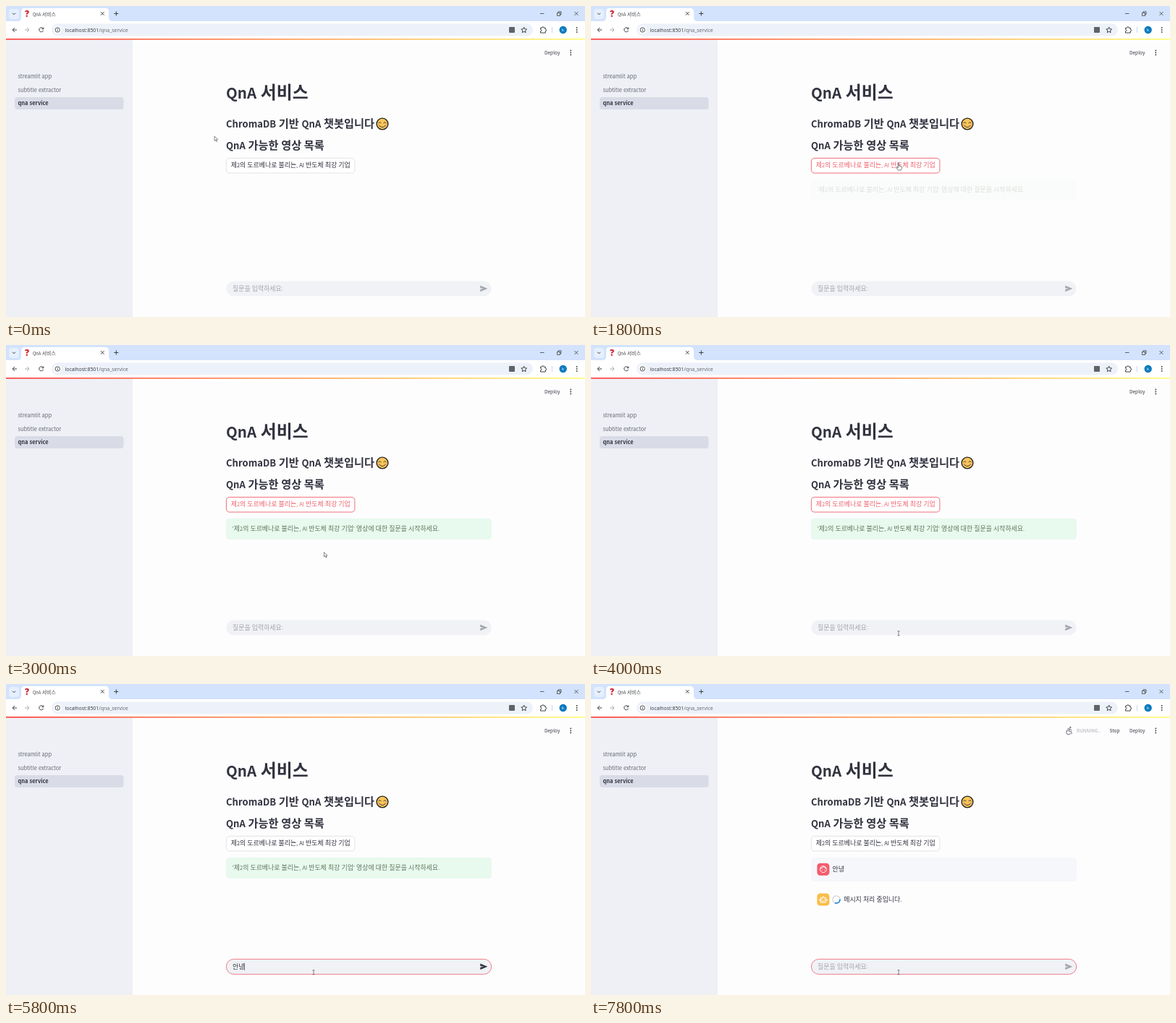
These frames come from a looping animation (800x430 px, 8 s). An HTML page:

```html
<!DOCTYPE html>
<html lang="ko">
<head>
<meta charset="utf-8">
<style>
html, body { margin: 0; width: 100%; height: 100%; overflow: hidden; background: #fefdfe; }
svg { display: block; width: 100vw; height: 100vh; }
text { white-space: pre; font-family: "Noto Sans CJK KR", "Noto Sans CJK", "Noto Sans", sans-serif; }
.ui { font-family: "Open Sans", "Noto Sans", sans-serif; }
.line { fill: none; stroke: #3c4043; stroke-width: 1; }
</style>
</head>
<body>
<svg id="stage" viewBox="0 0 800 430"></svg>
<script>
const LOOP = 8000, STEP = 200;
const INK = '#31333f', RED = '#ed5f6a', GREY = '#a3a5ae';
const VIDEO = '제2의 도르베나로 불리는, AI 반도체 최강 기업';

// Hangul and Latin get separate sizes so both match one nominal size.
const runs = (size, str, hangul = 1.072) => str.split(/([가-힣ㄱ-ㅎ]+)/).filter(Boolean).map(part => {
  const scale = /[가-힣ㄱ-ㅎ]/.test(part) ? hangul : 0.895;
  return `<tspan font-size="${(size * scale).toFixed(2)}">${part}</tspan>`;
}).join('');
const text = (x, y, size, str, fill = INK, extra = '') =>
  `<text x="${x}" y="${y}" fill="${fill}" ${extra}>${runs(size, str)}</text>`;
const heading = (y, size, str) =>
  `<text x="304" y="${y}" fill="${INK}" font-weight="700">${runs(size, str, 1.043)}</text>`;
const rect = (x, y, w, h, r, fill, extra = '') =>
  `<rect x="${x}" y="${y}" width="${w}" height="${h}" rx="${r}" fill="${fill}" ${extra}/>`;
const circle = (x, y, r, fill, extra = '') =>
  `<circle cx="${x}" cy="${y}" r="${r}" fill="${fill}" ${extra}/>`;
const line = (d, extra = '') => `<path class="line" d="${d}" ${extra}/>`;
const group = (id, body, extra = '') => `<g id="${id}" ${extra}>${body}</g>`;
const kebab = (x, y) => [-3, 0, 3].map(d => circle(x, y + d, 0.9, '#3c4043')).join('');

const browser = `
  ${rect(0, 0, 800, 30, 0, '#d3e3fd')}
  ${rect(4, 4, 14, 14, 4, '#e6effe')}
  ${line('M9 9.8l2 2 2-2')}
  <path d="M16 21q5 0 5-5V8q0-5 5-5H137q5 0 5 5v8q0 5 5 5z" fill="#fff"/>
  ${rect(0, 21, 800, 24, 0, '#fff')}
  <text class="ui" x="26" y="15.3" font-size="12" font-weight="800" fill="#d3202f">?</text>
  ${text(37, 13.6, 6.4, 'QnA 서비스', '#3c4043')}
  ${line('M131 8.2l4.5 4.5m0-4.5l-4.5 4.5M149.3 10.5h6m-3-3v6')}
  ${line('M738 10.5h5.5M761.5 9.5h4v4h-4zM763 9.3v-1.5h4v4h-1.3M785.5 8l5 5m0-5l-5 5', 'style="stroke-width:.8"')}
  ${line('M15 33H9m3-3l-3 3 3 3')}
  ${line('M26 33h6m-3-3l3 3-3 3', 'style="stroke:#a9adb2"')}
  ${line('M51.3 31.2a3 3 0 1 0 .3 2.6M51.8 29.5v2.3h-2.3')}
  ${rect(63, 24.5, 665, 17, 8.5, '#edf1fa')}
  ${circle(71.2, 33, 5.5, '#fff')}
  ${circle(71.2, 33, 3.2, 'none', 'stroke="#3c4043" stroke-width=".9"')}
  ${line('M71.2 32.5v2.2M71.2 31v.8')}
  <text class="ui" x="81.5" y="35.7" font-size="6.95" fill="#33363b">localhost:8501<tspan fill="#5f6368">/qna_service</tspan></text>
  ${rect(695, 29, 8, 8, 1, '#5f6368')}
  ${line('M715.7 29.3l1.1 2.5 2.8.3-2.1 1.9.6 2.7-2.4-1.4-2.4 1.4.6-2.7-2.1-1.9 2.8-.3z')}
  ${line('M738.5 30.3h2.2q0-1.5 1.2-1.5t1.2 1.5h2.2v2q1.5 0 1.5 1.2t-1.5 1.2v2.4h-6.8v-2.2q1.6 0 1.6-1.3t-1.6-1.3z')}
  ${line('M754.5 29v8', 'style="stroke:#c3d5f5"')}
  ${circle(769.7, 33, 5.2, '#0a7abf')}
  <text class="ui" x="769.7" y="35" font-size="6" fill="#fff" text-anchor="middle">k</text>
  ${kebab(788.7, 33)}`;

const emoji = `
  ${circle(520, 163, 7.9, '#fbc658', 'stroke="#222" stroke-width="1.4"')}
  ${circle(515.2, 165, 1.5, '#f59a62')}${circle(524.8, 165, 1.5, '#f59a62')}
  ${line('M514.8 161.8q1.7-2.6 3.4 0M521.8 161.8q1.7-2.6 3.4 0M516.2 165.7q3.8 4 7.6 0', 'stroke-linecap="round"')}`;

const page = `
  ${rect(0, 45, 175, 385, 0, '#eef0f5')}
  ${rect(0, 45, 800, 1.8, 0, 'url(#deco)')}
  ${rect(12, 126, 150.5, 17, 4, '#d9dce6')}
  ${text(16.5, 100, 8.33, 'streamlit app', '#676975')}
  ${text(16.5, 118.8, 8.33, 'subtitle extractor', '#676975')}
  ${text(16.5, 137.3, 8.33, 'qna service', INK, 'font-weight="700"')}
  ${text(744, 67, 7.3, 'Deploy')}
  ${kebab(780.3, 64.5)}
  ${heading(127.8, 22.9, 'QnA 서비스')}
  ${heading(168.2, 14.6, 'ChromaDB 기반 QnA 챗봇입니다')}
  ${emoji}
  ${heading(198.2, 14.6, 'QnA 가능한 영상 목록')}
  ${rect(304.4, 210.4, 177.5, 20.6, 4.2, '#fff', 'id="button" stroke-width=".9"')}
  ${text(393.2, 223.4, 8.33, VIDEO, INK, 'id="label" text-anchor="middle"')}`;

const notice = group('notice',
  rect(304, 239.7, 367, 29.3, 4.2, '#e8f9ee') +
  text(312.7, 257, 8.33, `'${VIDEO}' 영상에 대한 질문을 시작하세요.`, '#63765c'));

const question = group('question', `
  ${rect(304, 239.7, 367, 33.3, 4.2, '#f6f7fa')}
  ${rect(312.4, 247.7, 17, 17, 4.2, '#f45b6c')}
  <g fill="none" stroke="#fff" stroke-width="1">
    ${circle(320.9, 256.2, 4.4, 'none')}
    <path d="M317 254.8q3 .2 4.2-2.6 1.3 2.4 4 2.4"/>
  </g>
  ${circle(319.3, 257, 0.6, '#fff')}${circle(322.6, 257, 0.6, '#fff')}
  ${text(333.5, 259, 8.33, '안녕')}`);

const answer = group('answer', `
  ${rect(312.4, 289.6, 17, 17, 4.2, '#fbbd48')}
  <g fill="none" stroke="#fff" stroke-width="1">
    <path d="M317.6 295.2h6.6v7h-6.6zM320.9 295v-2M317.4 297.8h-1.6v2h1.6M324.4 297.8h1.6v2h-1.6M319.2 300.5h3.4"/>
  </g>
  ${circle(319.4, 297.7, 0.7, '#fff')}${circle(322.4, 297.7, 0.7, '#fff')}`);

const spinner = group('spinner', `
  ${circle(339, 298, 5, 'none', 'stroke="#d9dbe0" stroke-width="1.5"')}
  <path id="arc" d="M339 293a5 5 0 0 1 4.33 7.5" fill="none" stroke="#2b8be0" stroke-width="1.7"/>
  ${text(349.2, 301, 8.33, '메시지 처리 중입니다.')}`);

const input = `
  ${rect(304.4, 380.4, 366.3, 20.9, 10.4, '#f0f2f6', 'id="field" stroke-width=".8"')}
  ${text(313, 393.8, 8.33, '질문을 입력하세요:', GREY, 'id="placeholder"')}
  ${text(313, 393.8, 8.33, '', INK, 'id="typed"')}
  ${rect(0, 386, 0.7, 10, 0, INK, 'id="caret"')}
  <path id="send" d="M655.3 386.6l10 4.2-10 4.2v-3.3l5-.9-5-.9z"/>`;

// Small figures drawn around (0, 0) with the head as a separate dot.
const POSES = [
  { head: [1.5, -4.3], d: 'M1 -2.5L-.5 1l2 1.7-.8 3M-.5 1l-1.5 2.4-2.6.3M.8 -2.2l-3 1-.8 1.8M.8 -2.2l1.6 2 2.3-.4' },
  { head: [1.8, -4.3], d: 'M1 -2.7L-.3 1h3l1.2 3.8M.8 -2.2L3.7-.4M-1.2 -.4a3 3 0 1 0 3.3 4M.8 -2.4l-3 .2' },
  { head: [0, -4.6], d: 'M-4.6 -2.4h9.2M0 -2.6V1.2M-.6 -2v3.2L-1.3 6M.6 -2v3.2L1.3 6' },
  { head: [2.4, -3.6], d: 'M1.5 -2.4L-2 .2l2.4 1.4-.8 3.2M1.5 -2.4l2 2.6h1.3M-2 .2l-2.6 3' }
];
const running = group('running', `
  ${group('figure', '', 'transform="translate(660.5 64.3)"')}
  ${text(671, 67, 7.3, 'RUNNING...', '#a9abb4')}
  ${text(716.5, 67, 7.3, 'Stop')}`);

const cursors =
  group('arrow', '<path d="M0 0v6.4l1.5-1.3 1.1 2.3 1-.4-1-2.3h2z" fill="#fff" stroke="#555" stroke-width=".7"/>') +
  group('hand', '<path d="M-.7 .6Q0-.5.7.6V4l3.2.8q.9.4.7 1.5L4 8.3 3.2 10H-.6L-3.2 6.5q0-1.2 1.2-.7L-.7 6.8z" fill="#fff" stroke="#444" stroke-width=".7"/>') +
  group('beam', line('M-1.5-3h3M0-3v6M-1.5 3h3', 'style="stroke:#555;stroke-width:.7"'));

stage.innerHTML = `
  <defs><linearGradient id="deco"><stop stop-color="#ff4b4b"/><stop offset="1" stop-color="#fffd80"/></linearGradient></defs>
  ${rect(0, 0, 800, 430, 0, '#fefdfe')}
  ${browser}${page}${notice}${question}${answer}${spinner}${input}${running}${cursors}`;

const $ = id => document.getElementById(id);
const show = (id, on) => $(id).setAttribute('visibility', on ? 'visible' : 'hidden');
const clamp = v => Math.min(1, Math.max(0, v));
const ease = p => p * p * (3 - 2 * p);

const CLICK = 1400, FOCUS = 4100, SEND = 6000;
const PATH = [[200, 288, 180], [1000, 425, 217], [2400, 425, 217], [2800, 439.5, 286.5],
              [3300, 439.5, 286.5], [3900, 425, 398.7]];
const KEYS = [[4400, 'd'], [5200, ''], [5400, 'ㅇ'], [5600, '안'], [5800, '안녕'], [SEND, '']];

function pointer(t) {
  const i = PATH.findIndex(p => p[0] > t);
  if (i === 0) return PATH[0].slice(1);
  if (i < 0) return PATH[PATH.length - 1].slice(1);
  const [t0, x0, y0] = PATH[i - 1], [t1, x1, y1] = PATH[i];
  const p = ease((t - t0) / (t1 - t0));
  return [x0 + (x1 - x0) * p, y0 + (y1 - y0) * p];
}

function draw(t) {
  const [x, y] = pointer(t);
  const onButton = x > 304 && x < 482 && y > 210 && y < 231;
  const kind = onButton ? 'hand' : y > 380 ? 'beam' : 'arrow';
  for (const id of ['arrow', 'hand', 'beam']) show(id, id === kind);
  $(kind).setAttribute('transform', `translate(${x} ${y})`);

  const red = onButton || (t >= CLICK && t < FOCUS);
  $('button').setAttribute('stroke', red ? RED : '#dfe0e5');
  $('label').setAttribute('fill', red ? RED : INK);
  $('notice').setAttribute('opacity', t < SEND ? clamp((t - 1670) / 600) : 0);

  const focused = t >= FOCUS;
  const key = KEYS.filter(k => k[0] <= t).pop();
  const typed = key ? key[1] : '';
  $('field').setAttribute('stroke', focused ? RED : 'none');
  $('typed').innerHTML = runs(8.33, typed);
  show('placeholder', !typed);
  $('send').setAttribute('fill', typed ? INK : GREY);
  const blinkStart = key ? key[0] : FOCUS;
  show('caret', focused && (t - blinkStart) % 1060 < 530);
  $('caret').setAttribute('x', 312.6 + (typed ? $('typed').getComputedTextLength() : 0));

  show('question', t >= SEND);
  show('running', t >= SEND);
  show('answer', t >= 6200);
  show('spinner', t >= 6600);
  $('arc').setAttribute('transform', `rotate(${(t - 7800) * 0.36 + 85} 339 298)`);
  const pose = POSES[Math.floor(Math.max(0, t - SEND) / STEP) % POSES.length];
  $('figure').innerHTML = circle(...pose.head, 1.2, '#7d7f8a') +
    line(pose.d, 'style="stroke:#7d7f8a;stroke-width:1.1"');
}

function tick() {
  draw(Math.floor(performance.now() % LOOP / STEP) * STEP);
  requestAnimationFrame(tick);
}
tick();
</script>
</body>
</html>
```
